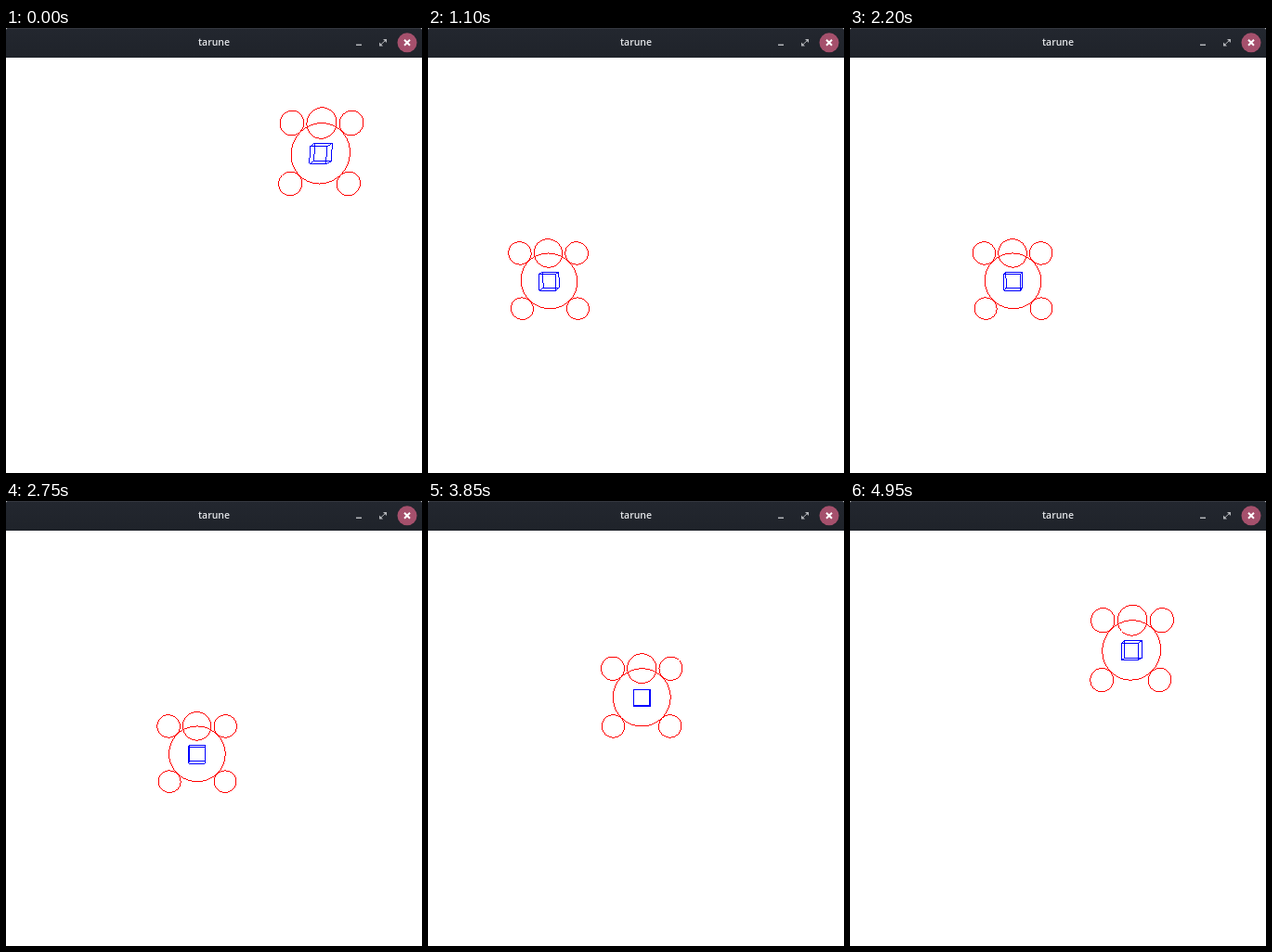
Write an HTML page with a canvas that moves like this. It is 448 px wide and 480 px high and loops after 5500 ms.

```html
<!DOCTYPE html>
<html lang="en">
<head>
<meta charset="utf-8">
<title>tarune</title>
<style>
  html, body { margin: 0; width: 100%; height: 100%; overflow: hidden; background: #fff; }
  canvas { display: block; }
</style>
</head>
<body>
<canvas id="stage" width="448" height="480"></canvas>
<script>
const ctx = document.getElementById('stage').getContext('2d');
const STEP = 550;

// Position of the figure at each step, in body radii from the view axis.
const path = [
  [3.62, 3.83], [-3.69, -.57], [-3.09, -.57], [-2.31, -.57], [-1.6, -.57],
  [-.6, -.57], [-.6, .42], [.2, 1.43], [.9, 2.21], [2.52, 3.04]
];

// Circles of the figure: x, y, radius.
const circles = [
  [0, 0, 1], [0, 1, .5],
  [-1, 1, .4], [1, 1, .4], [-1, -1, .4], [1, -1, .4]
];

const FOCAL = 388, DISTANCE = 12.74, TILT = .13;
const COS = Math.cos(TILT), SIN = Math.sin(TILT);

function project(x, y, z) {
  const scale = FOCAL / (DISTANCE - y * SIN - z * COS);
  return [224 + x * scale, 256 - (y * COS - z * SIN) * scale];
}

// One-pixel line without smoothing: one pixel per step of the longer axis, end excluded.
function line(a, b) {
  const main = Math.abs(b[0] - a[0]) > Math.abs(b[1] - a[1]) ? 0 : 1;
  const side = 1 - main;
  if (a[main] > b[main]) [a, b] = [b, a];
  const slope = (b[side] - a[side]) / (b[main] - a[main]);
  for (let m = Math.ceil(a[main] - .5); m < b[main] - .5; m++) {
    const s = Math.floor(a[side] + (m + .5 - a[main]) * slope);
    ctx.fillRect(main ? s : m, main ? m : s, 1, 1);
  }
}

function drawCircle(x, y, r) {
  const sides = 72;
  const point = i => {
    const a = i / sides * 2 * Math.PI;
    return project(x + r * Math.cos(a), y + r * Math.sin(a), 0);
  };
  for (let i = 0; i < sides; i++) line(point(i), point(i + 1));
}

function drawCube(x, y, half) {
  const corner = i => project(
    x + (i & 1 ? half : -half),
    y + (i & 2 ? half : -half),
    i & 4 ? half : -half
  );
  for (let i = 0; i < 8; i++) {
    for (const bit of [1, 2, 4]) if (!(i & bit)) line(corner(i), corner(i | bit));
  }
}

function stroke(color, width, ...segments) {
  ctx.strokeStyle = color;
  ctx.lineWidth = width;
  ctx.beginPath();
  for (const [x0, y0, x1, y1] of segments) {
    ctx.moveTo(x0, y0);
    ctx.lineTo(x1, y1);
  }
  ctx.stroke();
}

function triangle(...p) {
  ctx.beginPath();
  ctx.moveTo(p[0], p[1]);
  ctx.lineTo(p[2], p[3]);
  ctx.lineTo(p[4], p[5]);
  ctx.fill();
}

function drawTitleBar() {
  const shade = ctx.createLinearGradient(0, 0, 0, 32);
  shade.addColorStop(0, '#23272f');
  shade.addColorStop(1, '#1f232a');
  ctx.fillStyle = shade;
  ctx.beginPath();
  ctx.roundRect(0, 0, 448, 32, [2, 2, 0, 0]);
  ctx.fill();
  ctx.fillStyle = '#34373f';
  ctx.fillRect(2, 0, 444, 1);

  ctx.fillStyle = '#e4e6e9';
  ctx.font = '600 10.5px "Open Sans", "Noto Sans", sans-serif';
  ctx.textAlign = 'center';
  ctx.fillText('tarune', 224, 19);

  ctx.fillStyle = '#b4b6ba';
  ctx.fillRect(377, 17.5, 6, 1.5);
  triangle(406, 12, 410, 12, 410, 16);
  triangle(402, 15.5, 402, 19.5, 406, 19.5);
  stroke('#b4b6ba', 1, [403, 18.5, 409, 13]);

  ctx.fillStyle = '#a5506c';
  ctx.beginPath();
  ctx.arc(432, 15.8, 10.5, 0, 2 * Math.PI);
  ctx.fill();
  stroke('#fff', 2, [429, 12.8, 435, 18.8], [435, 12.8, 429, 18.8]);
}

function draw() {
  const step = Math.floor(performance.now() / STEP) % path.length;
  const [x, y] = path[step];
  ctx.fillStyle = '#fff';
  ctx.fillRect(0, 0, 448, 480);
  drawTitleBar();
  ctx.fillStyle = '#f00';
  for (const [cx, cy, r] of circles) drawCircle(x + cx, y + cy, r);
  ctx.fillStyle = '#00f';
  drawCube(x, y, .29);
  requestAnimationFrame(draw);
}
draw();
</script>
</body>
</html>
```
